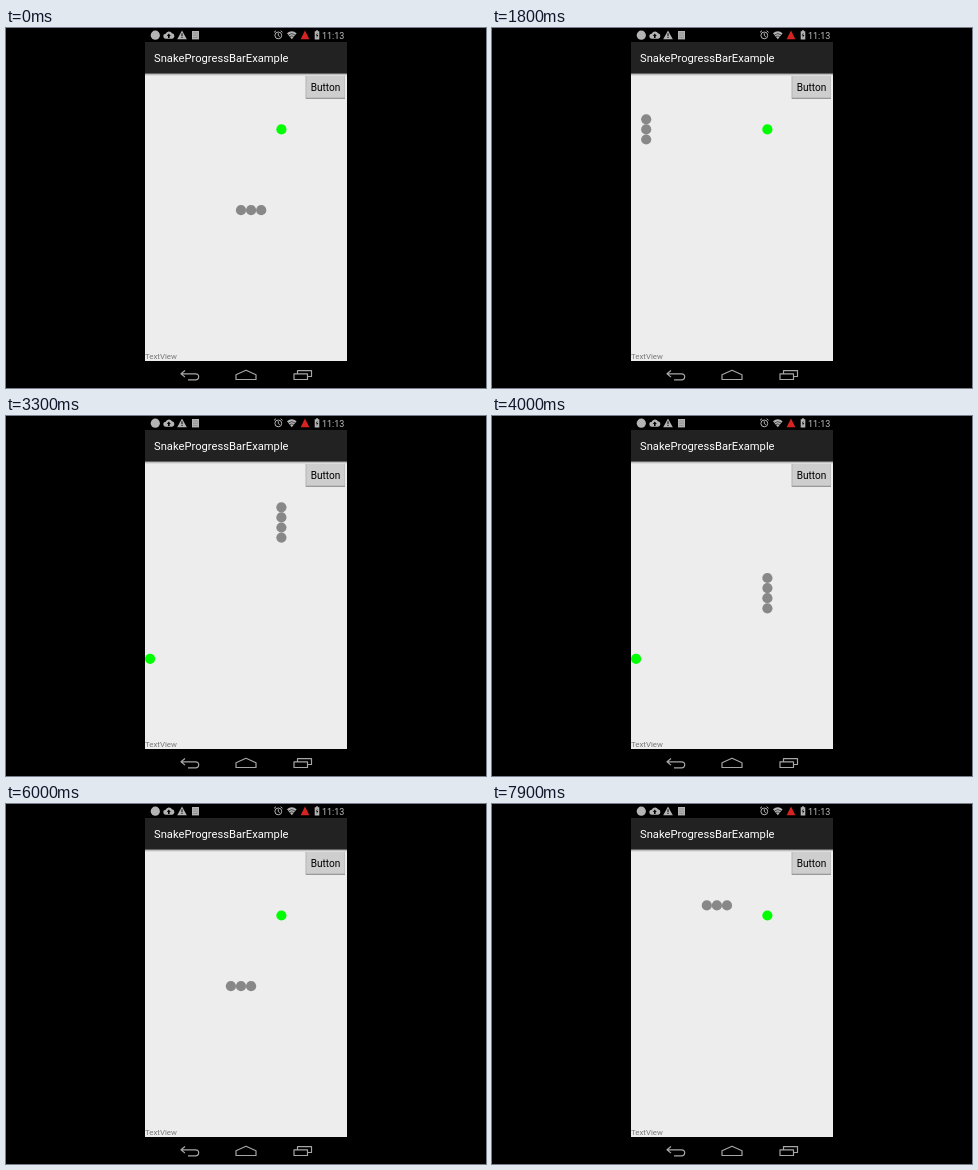
Animation, 480 px wide and 360 px high, one loop 8 s. Source, as an HTML page:

```html
<!DOCTYPE html>
<html lang="en">
<head>
<meta charset="utf-8">
<title>Snake</title>
<style>
html, body { margin: 0; width: 100%; height: 100%; overflow: hidden; background: #000; }
svg { display: block; width: 480px; height: 360px; font-family: Roboto, sans-serif; }
.line { fill: none; stroke: #b4b4b4; stroke-width: 1; }
.nav { fill: none; stroke: #a6a6a6; stroke-width: 1.2; stroke-linejoin: round; }
</style>
</head>
<body>
<svg viewBox="0 0 480 360">
  <defs>
    <linearGradient id="shade" x2="0" y2="1">
      <stop stop-color="#a59fa3"/><stop offset="1" stop-color="#ededed"/>
    </linearGradient>
  </defs>
  <rect width="480" height="360"/>
  <rect x="139" y="14" width="202" height="32" fill="#222"/>
  <rect x="139" y="46" width="202" height="287" fill="#ededed"/>
  <rect x="139" y="45.5" width="202" height="2.5" fill="url(#shade)"/>
  <text x="148" y="34" font-size="11.2" fill="#fff">SnakeProgressBarExample</text>

  <rect x="299.5" y="48" width="39.5" height="23" fill="#b5b5b5"/>
  <rect x="300.5" y="48" width="38" height="21.8" fill="#cecece"/>
  <rect x="300" y="69.8" width="39" height="1.2" fill="#999"/>
  <text x="304.7" y="63" font-size="10.1">Button</text>
  <text x="139" y="331" font-size="7.85" fill="#777">TextView</text>

  <!-- status bar -->
  <g fill="#b4b4b4">
    <circle cx="149.3" cy="7.2" r="4.6"/>
    <path d="M160 10.8a2.5 2.5 0 0 1-.3-5a3.5 3.5 0 0 1 6.3-.5a2.8 2.8 0 0 1 .2 5.5z"/>
    <path d="M176 2.5l4.8 8.7h-9.6z"/>
    <path d="M186 3h7v8.4h-7z"/>
    <path d="M281 5.2q4.7-4 9.6 0l-4.8 6z"/>
    <path d="M308.7 3.2h1.4v-1h1.8v1h1.4v8.3h-4.6z"/>
    <text x="316" y="11" font-size="9" fill="#c0c0c0">11:13</text>
  </g>
  <path d="M162.8 5.6l2 2.3h-1.2v2h-1.6v-2h-1.2z"/>
  <path d="M175.5 5.2h1v3h-1zm0 3.8h1v1h-1z"/>
  <path d="M187 5h5M187 7.2h5M187 9.4h5" stroke="#777" stroke-width=".6"/>
  <g class="line">
    <circle cx="272.3" cy="7.4" r="3.4"/>
    <path d="M272.3 5.2v2.4l1.5 1M268 4.3l2-1.6M276.6 4.3l-2-1.6"/>
  </g>
  <path d="M282.7 6.8q3.1-2.4 6.2 0M284 8.6q1.8-1.3 3.6 0" fill="none" stroke="#000" stroke-width=".6"/>
  <path d="M299 2.5l4.4 8.8h-8.8z" fill="#d62420"/>
  <path d="M311.5 4.5l-1.7 3h1.2l-.5 2.6l1.8-3.2h-1.2z"/>

  <!-- navigation bar -->
  <g class="nav">
    <path d="M179 342.5l-4 3.3l4 3.3M175.3 345.8h14.2q3.2 0 3.2 3t-3.2 3h-7.5"/>
    <path d="M230 351.5v-4.8l10-4.4l10 4.4v4.8z"/>
    <path d="M288 345.8h13.5v5.7h-13.5zM291.5 345.5v-2.8h14v5.8h-3.7"/>
  </g>
  <g id="board"></g>
</svg>
<script>
const LOOP = 8000, TICK = 100, CELL = 10.1, LEFT = 144.1, TOP = 50.9;
const START = [10, 13];
const DIRS = { L: [-1, 0], R: [1, 0], U: [0, -1], D: [0, 1] };

// Expands turns such as "L9 U9" into every cell the snake visits, after its initial body.
function route(turns) {
  let [x, y] = START;
  const cells = [[x + 2, y], [x + 1, y], [x, y]];
  for (const turn of turns.split(" ")) {
    const [dx, dy] = DIRS[turn[0]];
    for (let n = +turn.slice(1); n > 0; n--) cells.push([x += dx, y += dy]);
  }
  return cells;
}

const first = route("L9 U9 R12 D14 L13");
const second = route("L4 U8 R3");
const EATEN = 31, CRASH = 58;

const board = document.getElementById("board");
const dots = Array.from({ length: 5 }, (_, i) => {
  const dot = document.createElementNS("http://www.w3.org/2000/svg", "circle");
  dot.setAttribute("r", 5.1);
  dot.setAttribute("fill", i ? "#888" : "#0f0");
  return board.appendChild(dot);
});

function place(dot, cell) {
  dot.style.display = cell ? "" : "none";
  if (!cell) return;
  dot.setAttribute("cx", LEFT + CELL * cell[0]);
  dot.setAttribute("cy", TOP + CELL * cell[1]);
}

function state(tick) {
  if (tick >= CRASH) {
    const step = tick < 60 ? tick - CRASH : Math.max(2, tick - 64);
    return { cells: second, step, size: 3, food: [13, 6] };
  }
  const step = tick < 2 ? tick + 1 : tick;
  const fed = step >= EATEN;
  return { cells: first, step, size: fed ? 4 : 3, food: fed ? [0, 19] : [13, 5] };
}

function draw(now) {
  const { cells, step, size, food } = state(Math.floor(now % LOOP / TICK));
  const body = cells.slice(step + 3 - size, step + 3);
  [food, ...body].forEach((cell, i) => place(dots[i], cell));
  if (size < 4) place(dots[4]);
}

let begin;
function frame(now) {
  begin ??= now;
  draw(now - begin);
  requestAnimationFrame(frame);
}
draw(0);
requestAnimationFrame(frame);
</script>
</body>
</html>
```
